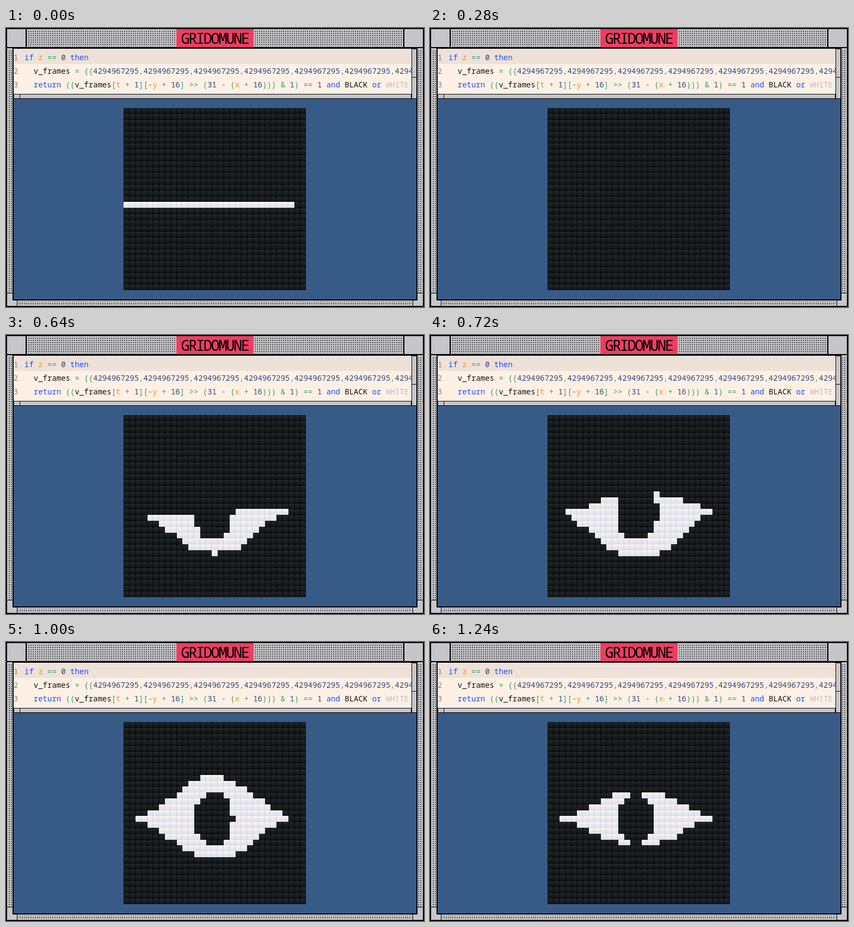
An HTML page with a canvas that plays this animation: 768 px wide and 512 px high, repeating every 1.28 s.

```html
<!DOCTYPE html>
<html lang="en">
<head>
<meta charset="utf-8">
<style>
html, body { margin: 0; width: 768px; height: 512px; overflow: hidden; background: #000; }
canvas { position: absolute; left: 0; top: 0; }
#title {
  position: absolute; left: 313px; top: 2px; width: 142px; height: 33px;
  background: #ed3e62; color: #000; text-align: center; text-indent: -1px;
  font: 500 27px/34px "Noto Sans Mono", monospace; letter-spacing: -2.4px;
}
#code {
  position: absolute; left: 14px; top: 39px; width: 731px; height: 82px; margin: 0;
  overflow: hidden; font: 14px/25px "Noto Sans Mono", monospace; color: #111;
}
#code div { position: absolute; left: 20px; white-space: pre; }
#code i { position: absolute; left: -20px; font-style: normal; color: #8c8480; }
.key { color: #1c4ff0; } .var { color: #ff8a1c; } .op { color: #38a169; }
.num { color: #2b4778; } .dim { color: #c3bfbd; }
</style>
</head>
<body>
<canvas id="stage" width="768" height="512"></canvas>
<div id="title">GRIDOMUNE</div>
<pre id="code"></pre>
<script>
const ctx = document.getElementById("stage").getContext("2d");
const LOOP = 1280, STEP = 40, N = 31, MID = 16;
const colX = k => Math.round(216.4 + k * 10.8);
const rowY = r => Math.round(146.7 + r * 10.79);

// Code panel
const lines = [
  "if z == 0 then",
  "  v_frames = {{" + "4294967295,".repeat(8),
  "  return ((v_frames[t + 1][-y + 16] >> (31 - (x + 16))) & 1) == 1 and BLACK or WHITE"
];
function kind(w) {
  if (/^(if|then|return|and|or)$/.test(w)) return "key";
  if (/^[txyz]$/.test(w)) return "var";
  if (/^\d+$/.test(w)) return "num";
  if (w === "WHITE") return "dim";
  return /^\w/.test(w) ? "" : "op";
}
lines.forEach((text, n) => {
  const row = document.createElement("div");
  row.style.top = n * 25 + 2 + "px";
  const no = document.createElement("i");
  no.textContent = n + 1;
  row.append(no);
  for (const w of text.match(/\w+|\s+|[^\w\s]+/g)) {
    const s = document.createElement("span");
    s.className = kind(w);
    s.textContent = w;
    row.append(s);
  }
  document.getElementById("code").append(row);
});

// Window and dark cubes
function box(c, x, y, w, h, fill) {
  c.fillStyle = fill;
  c.fillRect(x, y, w, h);
}
function panel(c, x, y, w, h, fill) {
  box(c, x, y, w, h, "#000");
  box(c, x + 1, y + 1, w - 2, h - 2, fill);
}
function shade(c, x, y, dx, dy, ...colors) {
  const g = c.createLinearGradient(x, y, x + dx, y + dy);
  colors.forEach((col, i) => g.addColorStop(i / (colors.length - 1), col));
  return g;
}
function makeBase() {
  const cv = document.createElement("canvas");
  cv.width = 768; cv.height = 512;
  const c = cv.getContext("2d");
  const GREY = "#c6c6c9";
  const tile = document.createElement("canvas");
  tile.width = tile.height = 4;
  const t = tile.getContext("2d");
  box(t, 0, 0, 4, 4, GREY);
  box(t, 1, 1, 2, 2, "#4a4a4e");
  const dots = c.createPattern(tile, "repeat");

  box(c, 0, 0, 768, 512, "#000");
  box(c, 2, 2, 764, 508, GREY);
  box(c, 38, 4, 692, 30, dots);
  box(c, 3, 40, 8, 446, dots);
  box(c, 757, 40, 8, 446, dots);
  box(c, 22, 502, 724, 7, dots);
  box(c, 0, 35, 768, 2, "#000");
  for (const x of [36, 730]) box(c, x, 2, 2, 35, "#000");
  for (const x of [2, 756]) box(c, x, 486, 10, 1, "#000");
  for (const x of [20, 747]) box(c, x, 500, 1, 10, "#000");

  box(c, 12, 36, 744, 464, "#000");
  box(c, 14, 38, 740, 460, "#385a87");
  box(c, 14, 38, 731, 28, "#ede1d8");
  box(c, 14, 66, 731, 55, "#fff0e6");
  panel(c, 745, 38, 10, 92, GREY);
  panel(c, 745, 38, 10, 53, GREY);
  panel(c, 14, 121, 731, 9, GREY);
  panel(c, 14, 121, 12, 9, GREY);

  box(c, colX(0), rowY(0), colX(N) - colX(0), rowY(N) - rowY(0), "#07090a");
  for (let r = 0; r < N; r++) {
    const y = rowY(r), h = rowY(r + 1) - y;
    c.fillStyle = shade(c, 0, y, 0, h, "#252a2c", "#1a1e20", "#121517");
    for (let k = 0; k < N; k++) {
      c.beginPath();
      c.roundRect(colX(k) + 0.5, y + 0.4, colX(k + 1) - colX(k) - 1, h - 1, 2);
      c.fill();
    }
  }
  return cv;
}

// Lid curves of the open eye: column, distance from the middle row
const upper = [[2, 0], [6, 2.2], [7, 3.4], [12, 8], [14.5, 8.3], [17, 8], [20, 6], [25, 2], [27, 0]];
const lower = [[2, 0], [3, 0], [5, 2], [7, 3.4], [10, 6], [12, 7], [15, 7.7], [18, 7], [20, 6], [25, 1], [27, 0]];
function curve(pts, x) {
  const i = pts.findIndex(p => p[0] > x);
  const [x1, y1] = pts[i < 0 ? pts.length - 1 : i];
  const [x0, y0] = pts[(i < 0 ? pts.length - 1 : i) - 1];
  return y0 + (y1 - y0) * (x - x0) / (x1 - x0);
}
const snap = v => Math.floor(v + 0.15);
function noise(n) {
  const v = Math.sin(n * 12.9898) * 43758.5453;
  return v - Math.floor(v);
}

// A straight line that breaks up
function shutEye(t, cells) {
  for (let k = 0; k < 29; k++)
    if (noise(k) >= Math.sqrt(t / 280)) cells.push([MID, k]);
}

// Broken slits growing in from both corners
function cornerSlits(t, cells) {
  const reach = (t - 360) / 30;
  for (let k = 1; k < 29; k++) {
    const d = Math.min(k - 1, 28 - k);
    if (d < reach && k % 8 !== 2) cells.push([MID + Math.floor(d / 2), k]);
  }
}

// Lower lid drops, upper lid lifts off a tilted line, then both close in
function openEye(t, cells) {
  const open = Math.min(1, 0.9 + (t - 640) / 320, 0.85 - (t - 1000) * 0.001125);
  const lift = Math.min(1, (t - 640) / 200);
  const rx = 2.83 + 0.68 * open, ry = 3.9 + 0.7 * open;
  for (let k = 2; k <= 27; k++) {
    const tilt = (k - 15) / 20;
    const top = MID - snap(lift * open * curve(upper, k) + (1 - lift) * tilt);
    const end = MID + snap(open * curve(lower, k));
    for (let r = top; r <= end; r++)
      if (Math.hypot((k - 14.6) / rx, (r - MID) / ry) > 1) cells.push([r, k]);
  }
}

function litCells(t) {
  const cells = [];
  if (t < 280) shutEye(t, cells);
  else if (t >= 560) openEye(t, cells);
  else if (t >= 400) cornerSlits(t, cells);
  return cells;
}

const base = makeBase();
function drawWhite(r, k) {
  const x = colX(k), y = rowY(r), w = colX(k + 1) - x, h = rowY(r + 1) - y;
  box(ctx, x, y, w, h, "#c3c8d2");
  box(ctx, x, y, w - 0.6, h - 0.5, shade(ctx, x, y, 3, h, "#fff3ec", "#fdefe8", "#e0e7f3", "#e2e8f2"));
}

let shown = -1;
function tick(now) {
  const n = Math.floor((now % LOOP) / STEP);
  if (n !== shown) {
    shown = n;
    ctx.drawImage(base, 0, 0);
    for (const [r, k] of litCells(n * STEP)) drawWhite(r, k);
  }
  requestAnimationFrame(tick);
}
tick(0);
</script>
</body>
</html>
```
